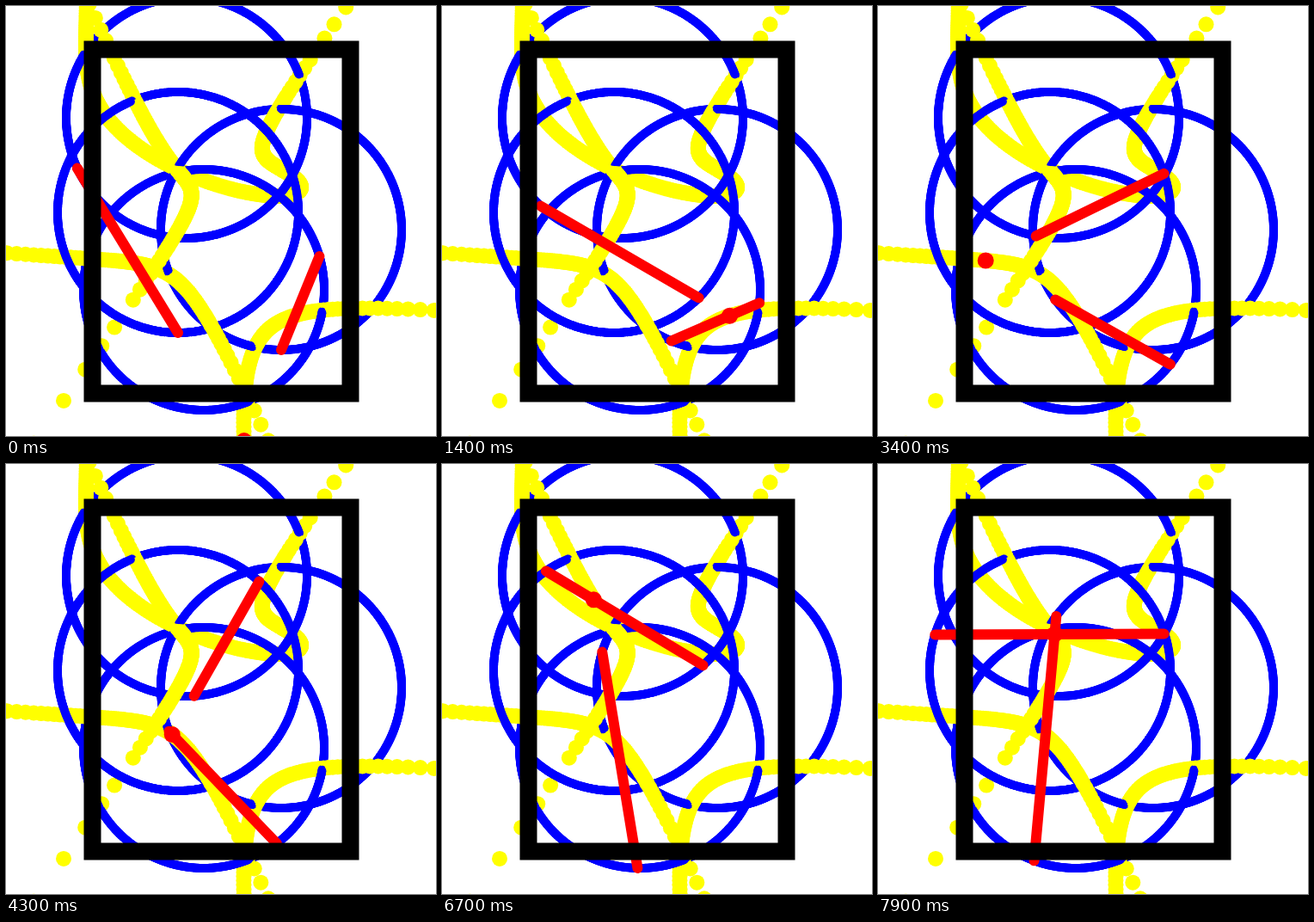
These frames come from a looping animation (500x500 px, 8000 ms). An HTML page with a canvas:

```html
<!DOCTYPE html>
<html>
<head>
<meta charset="utf-8">
<style>
html, body { margin: 0; width: 100%; height: 100%; overflow: hidden; background: #fff; }
canvas { display: block; }
</style>
</head>
<body>
<canvas id="stage" width="500" height="500"></canvas>
<script>
const RADIUS = 140;
const STEP_MS = 100, STEPS = 80;
const TRAIL_START = 103.75, TRAIL_DOTS = 899;

// Centre, start angle and degrees per step of each crank; bars join 0-1 and 2-3.
const cranks = [
  { x: 210, y: 130, start: 155.25, speed: -1.6 },
  { x: 200, y: 240, start: 90, speed: -3.2 },
  { x: 320, y: 260, start: 90, speed: 1.6 },
  { x: 230, y: 330, start: -16.15, speed: 1.6 }
];

const ctx = document.getElementById('stage').getContext('2d');

function pins(step) {
  return cranks.map(c => {
    const a = (c.start + c.speed * step) * Math.PI / 180;
    return { x: c.x + RADIUS * Math.cos(a), y: c.y + RADIUS * Math.sin(a) };
  });
}

// Where the two bars, extended endlessly, cross.
function crossing([a, b, c, d]) {
  const ux = b.x - a.x, uy = b.y - a.y;
  const vx = d.x - c.x, vy = d.y - c.y;
  const s = ((c.x - a.x) * vy - (c.y - a.y) * vx) / (ux * vy - uy * vx);
  return { x: a.x + s * ux, y: a.y + s * uy };
}

function dot(g, p, r, color) {
  g.fillStyle = color;
  g.beginPath();
  g.arc(p.x, p.y, r, 0, 2 * Math.PI);
  g.fill();
}

function bar(p, q) {
  ctx.beginPath();
  ctx.moveTo(p.x, p.y);
  ctx.lineTo(q.x, q.y);
  ctx.stroke();
}

// Later dots cover earlier ones, so the traces are painted in time order.
function paintTraces() {
  const layer = document.createElement('canvas');
  layer.width = layer.height = 500;
  const g = layer.getContext('2d');
  g.fillStyle = '#fff';
  g.fillRect(0, 0, 500, 500);
  for (let i = 0; i < TRAIL_DOTS; i++) {
    const ends = pins(TRAIL_START + i / 4);
    ends.forEach(p => dot(g, p, 5, '#00f'));
    dot(g, crossing(ends), 9, '#ff0');
  }
  return layer;
}

const traces = paintTraces();

function draw(now) {
  const ends = pins(Math.floor(now / STEP_MS) % STEPS);
  ctx.drawImage(traces, 0, 0);

  ctx.strokeStyle = '#f00';
  ctx.lineWidth = 12;
  ctx.lineCap = 'round';
  bar(ends[0], ends[1]);
  bar(ends[2], ends[3]);
  dot(ctx, crossing(ends), 9.5, '#f00');

  ctx.strokeStyle = '#000';
  ctx.lineWidth = 20;
  ctx.strokeRect(100.5, 50.5, 300, 400);
}

let origin;
function tick(now) {
  origin ??= now;
  draw(Math.max(0, now - origin));
  requestAnimationFrame(tick);
}
draw(0);
requestAnimationFrame(tick);
</script>
</body>
</html>
```
